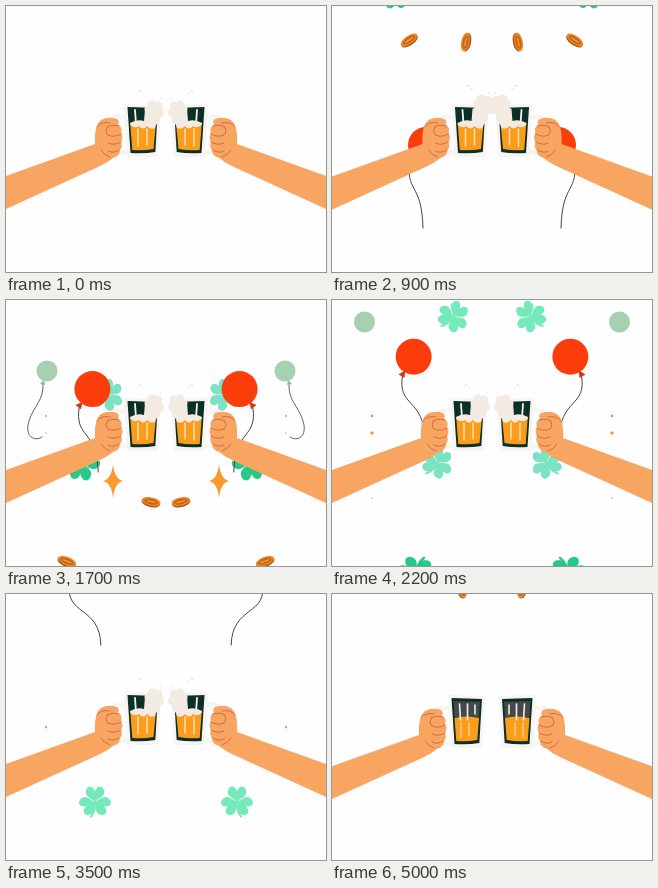
Recreate the animation shown at these times as an HTML page with a canvas. Size 320x266 px, loop 5.1 s.

```html
<!DOCTYPE html>
<html lang="en">
<head>
<meta charset="utf-8">
<title>Cheers</title>
<style>
html, body { margin: 0; height: 100%; overflow: hidden; background: #fefdff; }
canvas { display: block; width: 100vw; height: 100vh; }
</style>
</head>
<body>
<canvas id="stage" width="320" height="266"></canvas>
<script>
const ctx = document.getElementById('stage').getContext('2d');
const SKIN = '#f9a562', CREASE = '#b95a35', DARK = '#0b3027', BEER = '#fb9d1b',
      FOAM = '#f3ebe1', GLASS = '#f8f4ef', RED = '#fb3d0b', MINT = '#74eabb';

function fill(d, color) {
  ctx.fillStyle = color;
  ctx.fill(new Path2D(d));
}

function line(d, color, width = 1) {
  ctx.strokeStyle = color;
  ctx.lineWidth = width;
  ctx.stroke(new Path2D(d));
}

function oval(x, y, rx, ry, color, turn = 0) {
  ctx.fillStyle = color;
  ctx.beginPath();
  ctx.ellipse(x, y, rx, ry, turn, 0, 7);
  ctx.fill();
}

// Draws in a local frame placed at x, y.
function at(x, y, turn, scale, draw) {
  ctx.save();
  ctx.translate(x, y);
  ctx.rotate(turn);
  ctx.scale(scale, scale);
  draw();
  ctx.restore();
}

const clamp = v => Math.max(0, Math.min(1, v));
const pulse = (t, a, b) => Math.sin(Math.PI * clamp((t - a) / (b - a)));

function clover(x, y, turn, scale, color) {
  at(x, y, turn, scale, () => {
    line('M0 0Q1 9 -4 15', color, 2);
    for (const a of [0, 2.05, -2.05]) {
      at(0, 0, a, 1, () => fill('M0 0C-3 -3 -11 -5 -9 -11C-8 -16 -2 -17 0 -10C2 -17 8 -16 9 -11C11 -5 3 -3 0 0', color));
    }
  });
}

function coin(x, y, turn) {
  at(x, y, turn, 1, () => {
    oval(0, 1, 9.5, 4.6, '#a9500f');
    oval(0, 0, 9.5, 4.2, '#ee8522');
    oval(0, 0, 7, 2.8, '#c96516');
    line('M-4 0H4', '#f5a54a', 1.2);
  });
}

function redBalloon(t) {
  const u = t - 0.9, grow = clamp((t - 0.4) / 0.4);
  if (!grow) return;
  const x = 94 - 9.5 * u, y = 139 - 61 * u - 1.8 * u * u;
  const lean = 0.84 - 0.22 * u;
  at(x, y, 0, grow, () => {
    const kx = -21 * Math.sin(lean), ky = 21 * Math.cos(lean), end = 91 + 1.5 * u - x;
    line(`M${kx} ${ky}C${kx - 6} ${ky + 34} ${end - 1} ${ky + 22} ${end} 83`, '#30302e', 0.9);
    at(0, 0, lean, 1, () => fill('M0 16L3.5 23H-3.5Z', '#c93a1c'));
    oval(0, 0, 18, 18, RED);
  });
}

function greenBalloon(t) {
  const u = t - 1.7, grow = clamp((t - 1) / 0.3);
  if (!grow) return;
  at(41 - 17 * u, 71 - 98 * u, 0, grow, () => {
    ctx.save();
    ctx.scale(Math.cos(Math.PI * u), 1);  // the string sways from side to side
    line('M-4 12C-3 30 -13 34 -18 50C-23 66 -12 71 -5 66', '#4d554b', 0.9);
    fill('M-3 9L-2 14L-7 13Z', '#8ebb98');
    ctx.restore();
    oval(0, 0, 10.5, 10.5, '#a6d0b0');
  });
}

function confetti(t) {
  const u = t - 0.9, v = t - 1.7, w = t - 2.7;
  coin(133.5 + 14.5 * u, 36 + 207 * u, -1.36 + 1.96 * u);
  coin(77 - 20 * u, 34 + 284 * u, -0.6 + 1.2 * u);
  if (t > 4.95) coin(131, -5, 1.5);

  clover(63 + 16 * u, -15 + 222 * u, 3.1 + 0.2 * u, 1.15, '#26c985');
  clover(102 + 7 * v, 95 + 140 * v - 9 * v * v, 0.5 + 0.1 * v, 1, '#7ce3c2');
  clover(109 - 25 * w, 90 + 147 * w, 0.4 - 0.5 * w, 1, MINT);

  greenBalloon(t);
  redBalloon(t);

  const shine = pulse(t, 1.3, 2.1);
  at(107, 181, 0, shine, () => fill('M0 -17Q1.5 -2 10 0Q1.5 2 0 17Q-1.5 2 -10 0Q-1.5 -2 0 -17', '#fb9a2c'));
  const dots = [[40, 116, 1.5, 1.2, 3.3], [40, 133, 2.2, 1.4, 4], [40, 198, 1.3, 1.8, 3.6], [27, 116, 1, 2.2, 3.2]];
  for (const [x, y, r, a, b] of dots) {
    const size = r * pulse(t, a, b);
    oval(x, y, size, size, '#f79b3c');
  }
}

function arm() {
  line('M121 111H111Q107 111 107 116V141Q107 146 112 146H123', GLASS, 5);
  fill('M-120 214L0 170L89 138Q88 119 95 114Q102 110 111 113Q114 115 112 119Q117 121 115 127Q118 131 115 136Q117 141 114 144Q114 150 107 152Q101 157 92 161L0 203L-120 258Z', SKIN);
  line('M91 121Q95 115 104 117M101 121Q106 118 113 120M102 129Q108 132 115 128M102 137Q108 140 115 136M102 145Q107 148 113 144M102 121Q98 125 102 129M95 144Q98 149 104 151', CREASE, 0.7);
}

function glass() {
  fill('M118 98L155 99L152 151L121 151Z', GLASS);
  fill('M121.5 101L152 102L149.3 146Q138 148 124.5 147Z', DARK);
}

function freshMug() {
  glass();
  fill('M123.5 104L150 105L149 121L124.5 120Z', '#45494a');
  fill('M124.5 121Q136 118 149 121L147.3 143Q137 145 126.3 144Z', BEER);
  line('M129.5 107L130.5 123M137.5 107V123M145 108V117', '#f4f0ea', 1.6);
  line('M131 126V140M139 126V139', '#fde5bd');
}

function foamyMug(t) {
  const splash = pulse(t, 0.1, 1.7);
  glass();
  fill('M124.2 117H150L147.5 143Q137 145 126.3 144Z', BEER);
  line('M132 123V140M141 123V139', '#fde5bd', 1.4);
  line('M129 104L130 118', '#f6f4ee', 1.8);

  fill('M124 117Q131 113 138 115L139 103Q146 97 155 104L154 116Q150 117 149 122Q144 124 141 120Q137 125 133 120Q129 123 124.5 119Z', FOAM);
  const blobs = [[142, 103, 3.5], [146, 99, 4.5], [152, 100, 4.5], [153, 107, 5], [145, 112, 6]];
  for (const [x, y, r] of blobs) {
    const size = r * (1 + 0.2 * splash);
    oval(x + 2 * splash, y - 5 * splash, size, size, FOAM);
  }
  oval(156 + 2 * splash, 101, 4 * splash, 7 * splash, FOAM);
  for (const [x, y, r] of [[134, 85, 1.2], [138, 88, 0.8], [155, 92, 0.8]]) {
    oval(x, y - 5 * splash, r * 1.4, r, FOAM, -0.5);
  }
}

function half(t) {
  confetti(t);
  const pull = pulse(t, 4.4, 5), fresh = t > 4.55;
  const [dx, dy] = fresh ? [-2, 3] : [1.5 * pulse(t, 0.1, 1.7), 0];
  ctx.save();
  ctx.translate(dx - 45 * pull, 185 + dy + 10 * pull);
  ctx.rotate(0.3 * pull);
  ctx.translate(0, -185);
  arm();
  if (fresh) freshMug();
  else foamyMug(t);
  ctx.restore();
}

function frame(now) {
  const t = Math.floor(now % 5100 / 100) / 10;
  ctx.fillStyle = '#fefdff';
  ctx.fillRect(0, 0, 320, 266);
  half(t);
  ctx.save();
  ctx.translate(320, 0);
  ctx.scale(-1, 1);
  half(t);
  ctx.restore();
  requestAnimationFrame(frame);
}
ctx.lineCap = 'round';
frame(0);
</script>
</body>
</html>
```
